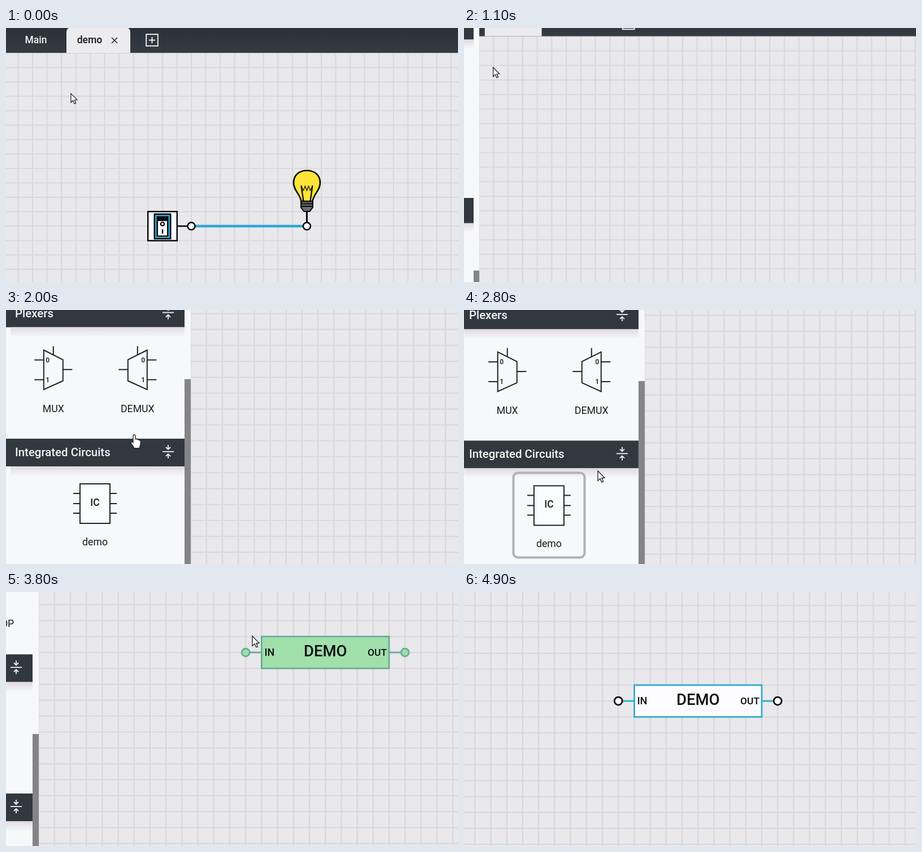
Write an HTML page with a canvas that moves like this. It is 800x450 px and loops after 5 s.

```html
<!DOCTYPE html>
<html lang="en">
<head>
<meta charset="utf-8">
<title>Circuit editor</title>
<style>
html, body { margin: 0; width: 100%; height: 100%; overflow: hidden; background: #e9e8eb; }
canvas { display: block; width: 800px; height: 450px; }
</style>
</head>
<body>
<canvas id="stage" width="800" height="450"></canvas>
<script>
const c = document.getElementById('stage').getContext('2d');
const LOOP = 5000, STEP = 100;
const CELL = 28.2, GX = 16.4, GY = 6.3;
const PAGE = { x: -300, y: 345.3, s: 0.906 };
const SWITCH_TAB = 900, PICK = 2700, DROP = 4100, HIDE = 4400;
const FONT = 'Roboto, "Open Sans", sans-serif';
const INK = '#17191c';

// time, offset x, offset y, zoom
const camera = [
  [0, PAGE.x, PAGE.y, PAGE.s], [950, PAGE.x, PAGE.y, PAGE.s],
  [1500, -96.6, 142, 0.956], [2000, 0, 0, 1], [2650, 0, 0, 1],
  [3200, -77, 37, 1], [3800, -269, 129, 1], [4600, -420, 215, 1]
];
// time, x, y in editor space
const pointer = [
  [0, 458, -253], [700, 429.4, -363.5], [950, 420, -362],
  [1500, 188.9, 15.7], [2000, 227, 221], [2350, 166, 335],
  [2600, 166, 335], [3200, 544, 74], [3800, 705, -51], [4100, 705, -52]
];

// Smooth curve through the keys, flat at turning points
function track(keys, t) {
  const last = keys.length - 1;
  if (t >= keys[last][0]) return keys[last].slice(1);
  let i = 0;
  while (t >= keys[i + 1][0]) i++;
  const a = keys[i], b = keys[i + 1], h = b[0] - a[0], u = (t - a[0]) / h;
  const slope = (k, n) => {
    if (k === 0 || k === last) return 0;
    const p = keys[k - 1], q = keys[k], r = keys[k + 1];
    return (q[n] - p[n]) * (r[n] - q[n]) <= 0 ? 0 : (r[n] - p[n]) / (r[0] - p[0]);
  };
  return a.slice(1).map((v, j) => {
    const n = j + 1, d = b[n] - v;
    return v + d * u * u * (3 - 2 * u)
      + h * u * (1 - u) * ((1 - u) * slope(i, n) - u * slope(i + 1, n));
  });
}

function pen(color, width) {
  c.strokeStyle = color;
  c.lineWidth = width;
}
function line(...p) {
  c.beginPath();
  c.moveTo(p[0], p[1]);
  for (let i = 2; i < p.length; i += 2) c.lineTo(p[i], p[i + 1]);
  c.stroke();
}
function rect(x, y, w, h, fill, stroke, width) {
  if (fill) { c.fillStyle = fill; c.fillRect(x, y, w, h); }
  if (stroke) { pen(stroke, width); c.strokeRect(x, y, w, h); }
}
function round(x, y, w, h, r) {
  c.beginPath();
  c.roundRect(x, y, w, h, r);
}
function dot(x, y, r, fill, stroke, width) {
  c.beginPath();
  c.arc(x, y, r, 0, 7);
  c.fillStyle = fill;
  c.fill();
  pen(stroke, width);
  c.stroke();
}
function text(s, x, y, size, weight = 400, color = INK, align = 'center') {
  c.font = `${weight} ${size}px ${FONT}`;
  c.fillStyle = color;
  c.textAlign = align;
  c.fillText(s, x, y);
}

function grid([ox, oy, s]) {
  pen('#d9d8dc', 2.3);
  const left = -ox / s, top = -oy / s, right = left + 800 / s, bottom = top + 450 / s;
  for (let x = GX + Math.floor((left - GX) / CELL) * CELL; x < right + 2; x += CELL) line(x, top, x, bottom);
  for (let y = GY + Math.floor((top - GY) / CELL) * CELL; y < bottom + 2; y += CELL) line(left, y, right, y);
}

function bulb(x) {
  pen('#080808', 3);
  line(x, 326, x, 344);
  c.fillStyle = '#68706d';
  c.beginPath();
  c.moveTo(x - 10.5, 307);
  c.lineTo(x + 10.5, 307);
  c.lineTo(x + 10.5, 318);
  c.lineTo(x + 5, 325);
  c.lineTo(x - 5, 325);
  c.lineTo(x - 10.5, 318);
  c.closePath();
  c.fill();
  pen('#080808', 2);
  c.stroke();
  line(x - 10, 311.5, x + 10, 311.5);
  line(x - 10, 316, x + 10, 316);
  c.fillStyle = '#ffe438';
  c.beginPath();
  c.moveTo(x - 10, 307);
  c.bezierCurveTo(x - 12, 294, x - 23.5, 288, x - 23.5, 274);
  c.bezierCurveTo(x - 23.5, 260, x - 13, 252.5, x, 252.5);
  c.bezierCurveTo(x + 13, 252.5, x + 23.5, 260, x + 23.5, 274);
  c.bezierCurveTo(x + 23.5, 288, x + 12, 294, x + 10, 307);
  c.closePath();
  c.fill();
  pen('#080808', 2.6);
  c.stroke();
  pen('#080808', 2.2);
  line(x - 6, 307, x - 10, 279);
  line(x + 6, 307, x + 10, 279);
  pen('#080808', 1.3);
  line(x - 9.5, 281, x - 6, 288, x - 3, 280, x, 288, x + 3, 280, x + 6, 288, x + 9.5, 281);
}

function circuit(t) {
  const k = (1 - Math.cos(t / 700 * Math.PI)) / 2;
  pen(`rgb(43,${166 - 35 * k},${218 - 7 * k})`, 4.5);
  line(334, 351, 527, 351);
  pen('#080808', 2.6);
  line(303, 351, 322, 351);
  rect(251.2, 325.2, 51.6, 51.6, '#fdfcfe', '#080808', 2.5);
  rect(261.5, 328.5, 31, 46, '#080808');
  rect(264, 331, 26, 41, '#2fabd8');
  rect(266.5, 333.5, 21, 36, '#080808');
  rect(269, 342, 16, 25.5, '#fdfcfe');
  dot(277, 347.2, 3.2, '#fdfcfe', '#080808', 2.2);
  pen('#080808', 2.3);
  line(277, 356.5, 277, 364.5);
  bulb(532.5);
  for (const x of [328, 532.5]) dot(x, 351, 6.5, '#fff', '#080808', 2.5);
}

function tabs(t) {
  const main = t >= SWITCH_TAB, light = '#ececef';
  const bar = c.createLinearGradient(0, 0, 0, 44);
  bar.addColorStop(0, '#2b3138');
  bar.addColorStop(1, '#343b43');
  rect(-5, 0, 1200, 44, bar);
  const tab = (x, w, fill) => {
    round(x, -1, w, 45, [8, 8, 0, 0]);
    c.fillStyle = fill;
    c.fill();
  };
  if (main) tab(6, 100, light);
  else {
    if (t >= 600) tab(6, 95, '#181b20');
    tab(107, 113, light);
  }
  const ink = on => on ? INK : '#f2f3f4';
  text('Main', 53, 27, 17.5, 500, ink(main));
  text('demo', 148, 27, 17.6, 500, ink(!main));
  pen(ink(!main), 1.4);
  line(187, 17, 197, 27);
  line(197, 17, 187, 27);
  rect(248.2, 11.2, 20.6, 20.6, null, '#eef0f1', 2);
  line(253, 21.5, 264, 21.5);
  line(258.5, 16, 258.5, 27);
}

function header(y, label) {
  rect(0, y, 316, 49, '#32383f');
  const shade = c.createLinearGradient(0, y + 49, 0, y + 66);
  shade.addColorStop(0, '#dfdae0');
  shade.addColorStop(1, '#f6f8fa');
  rect(8, y + 49, 308, 17, shade);
  text(label, 16, y + 31, 20.4, 500, '#f3f4f5', 'left');
  const x = 287, m = y + 23;
  pen('#f3f4f5', 1.8);
  line(x - 10, m, x + 10, m);
  for (const d of [-1, 1]) {
    line(x, m + 12 * d, x, m + 4 * d);
    line(x - 4, m + 8 * d, x, m + 4 * d, x + 4, m + 8 * d);
  }
}

function flipFlop(x, y, label) {
  pen('#222', 2);
  c.strokeRect(x - 25.5, y, 51, 70);
  for (const d of [18, 50]) {
    line(x - 35, y + d, x - 25.5, y + d);
    line(x + 25.5, y + d, x + 36, y + d);
  }
  line(x, y + 70, x, y + 80);
  line(x - 25.5, y + 45, x - 17, y + 50, x - 25.5, y + 55);
  text(label.split(' ')[0][0], x - 16, y + 23, 11, 500);
  text('Q', x + 17, y + 23, 11, 500);
  text("Q'", x + 18, y + 54, 11, 500);
  text("CLR'", x, y + 65, 9, 500);
  text(label, x, y + 113, 17.8);
}

// dir is 1 for a wide left side, -1 for a wide right side
function plexer(x, dir, label) {
  const at = d => x + d * dir;
  pen('#222', 2);
  c.beginPath();
  c.moveTo(at(-17), 71);
  c.lineTo(at(17), 88);
  c.lineTo(at(17), 125.5);
  c.lineTo(at(-17), 141);
  c.closePath();
  c.stroke();
  line(x, 64, x, 79);
  line(at(17), 105.5, at(33.5), 105.5);
  for (const [i, y] of [88.5, 123.5].entries()) {
    line(at(-17), y, at(-33.5), y);
    text(i, at(-10), y + 4, 12, 700, '#333');
  }
  text(label, x, 181, 17.7);
}

function chip(active) {
  if (active) {
    round(94.5, 285, 126, 150, 8);
    pen('#b0b1b4', 4);
    c.stroke();
  }
  rect(131, 308, 53, 70, '#fbfcfd', '#222', 2);
  for (const y of [325, 343, 360]) {
    line(119, y, 131, y);
    line(184, y, 196, y);
  }
  text('IC', 157.5, 347, 17.5, 500);
  text('demo', 157.5, 417, 17.7);
}

function sidebar(t) {
  rect(-200, -700, 527, 1600, '#f6f8fa');
  rect(316, 122.5, 11, 700, '#858587');
  header(-375, 'Flip-Flops');
  flipFlop(86.5, -300, 'SR FLIP-FLOP');
  flipFlop(234.5, -300, 'D FLIP-FLOP');
  flipFlop(86.5, -180, 'JK FLIP-FLOP');
  flipFlop(234.5, -180, 'T FLIP-FLOP');
  header(-18.5, 'Plexers');
  plexer(83.8, 1, 'MUX');
  plexer(232.8, -1, 'DEMUX');
  header(228, 'Integrated Circuits');
  chip(t >= 2300);
}

function block([px, py], placed) {
  const x = GX + Math.ceil((px - GX) / CELL) * CELL;
  const y = GY + Math.ceil((py - GY) / CELL) * CELL;
  const w = 8 * CELL, h = 2 * CELL, m = y + CELL;
  const edge = placed ? '#2fadd2' : '#6aab9d';
  pen(edge, 3);
  line(x - 21, m, x, m);
  line(x + w, m, x + w + 21, m);
  rect(x, y, w, h, placed ? '#fdfcff' : '#a1dfab', edge, 2.8);
  for (const d of [-CELL, w + CELL]) dot(x + d, m, 7, placed ? '#fff' : '#9cdfa6', placed ? '#0c0c0d' : edge, 2.8);
  text('IN', x + 5, m + 6, 18, 500, '#0c0f10', 'left');
  text('OUT', x + w - 4, m + 6, 17.4, 500, '#0c0f10', 'right');
  text('DEMO', x + w / 2, y + 35, 27.5, 500, '#0c0f10');
}

function arrow() {
  c.beginPath();
  c.moveTo(0, 0);
  for (const [x, y] of [[0, 17.5], [4, 13.8], [6.8, 20], [9.6, 18.8], [6.9, 12.8], [12, 12.4]]) c.lineTo(x, y);
  c.closePath();
}
function hand() {
  c.beginPath();
  c.moveTo(-2, 2);
  c.quadraticCurveTo(0, -2, 2, 2);
  c.lineTo(2.5, 8);
  c.quadraticCurveTo(4.5, 6.2, 6, 8.8);
  c.quadraticCurveTo(8, 7.4, 9, 10);
  c.quadraticCurveTo(11.5, 9, 11.5, 12.5);
  c.quadraticCurveTo(11.5, 18, 9, 24);
  c.lineTo(0, 24);
  c.quadraticCurveTo(-2, 20, -6, 15);
  c.quadraticCurveTo(-6, 11, -2, 14);
  c.closePath();
}
function cursor([x, y], t) {
  c.save();
  c.translate(x, y);
  (t >= 1300 && t < PICK ? hand : arrow)();
  c.fillStyle = '#fff';
  c.fill();
  pen('#16181b', 1.3);
  c.stroke();
  c.restore();
}

function draw(t) {
  const cam = track(camera, t), tip = track(pointer, t);
  c.setTransform(1, 0, 0, 1, 0, 0);
  rect(0, 0, 800, 450, '#e9e8eb');
  c.setTransform(cam[2], 0, 0, cam[2], cam[0], cam[1]);
  grid(cam);
  c.save();
  c.scale(1 / PAGE.s, 1 / PAGE.s);
  c.translate(-PAGE.x, -PAGE.y);
  if (t < SWITCH_TAB) circuit(t);
  tabs(t);
  c.restore();
  if (t >= PICK && tip[0] > 330) block(tip, t >= DROP);
  sidebar(t);
  if (t < HIDE) cursor(tip, t);
}

const start = performance.now();
function tick() {
  const t = (performance.now() - start) % LOOP;
  draw(Math.floor(t / STEP) * STEP);
  requestAnimationFrame(tick);
}
tick();
</script>
</body>
</html>
```
